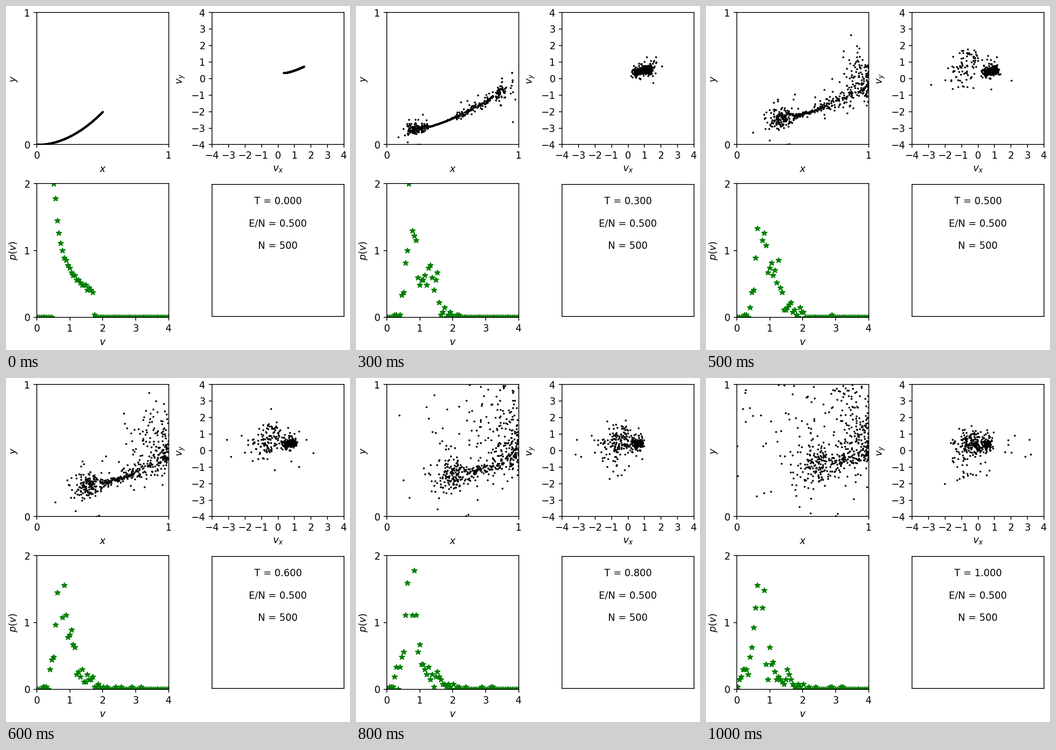
Recreate the animation shown at these times as a matplotlib script. Size 748x748 px, loop 1.05 s.

```python
import numpy as np
import matplotlib.pyplot as plt
from matplotlib.animation import FuncAnimation

SIZE, DPI = 748, 150
N, FRAMES, SUB = 500, 21, 10
DT = 0.05 / SUB


def simulate():
    """Stretched chain: both ends contract, the rest flies freely into the walls."""
    rng = np.random.default_rng(12)
    s = np.linspace(0, 1, N)
    pos = np.column_stack([s / 2, s**2 / 4])
    vel = np.exp(3 * pos)
    vel /= np.sqrt((vel**2).sum(1).mean())

    # Noise with a heavy tail
    noise = rng.normal(0, 0.08, (N, 2))
    noise *= np.where(rng.random(N) < 0.2, 3, 1)[:, None]

    rear, mid, front = s < 0.31, (s >= 0.31) & (s < 0.55), s > 0.85
    kick_time = rng.uniform(0.1, 0.3, N)
    kick_vel = vel + 1.3 * noise

    kick_time[rear] = 0.22 * (s[rear] / 0.31) ** 1.5
    clump = np.column_stack([0.56 - 0.28 * s, np.full(N, 0.385)])
    kick_vel[rear] = (clump + noise)[rear]

    kick_time[mid] = rng.uniform(0.25, 0.6, mid.sum())
    kick_vel[mid] = (0.96 * vel + 0.6 * noise)[mid]

    kick_time[front] = 1 - s[front]
    tip = np.column_stack([1.3 + 0.6 * (1 - s), 0.55 + 0.5 * (1 - s)])
    kick_vel[front] = (tip + 1.2 * noise)[front]

    def scatter(v, mean, spread, gain):
        n = len(v)
        angle = np.radians(rng.normal(mean, spread, n))
        speed = np.hypot(*v.T) * np.clip(rng.normal(gain, 0.3, n), 0.3, 1.6)
        return speed[:, None] * np.column_stack([np.cos(angle), np.sin(angle)])

    kicked = np.zeros(N, bool)
    bounced = np.zeros(N, bool)
    history = [(pos.copy(), vel.copy())]
    for step in range(1, (FRAMES - 1) * SUB + 1):
        now = ~kicked & ~bounced & (kick_time <= step * DT)
        vel[now] = kick_vel[now]
        kicked |= now
        pos += vel * DT

        hit = (pos[:, 0] > 1) & ~bounced
        vel[hit] = scatter(vel[hit], 112, 50, 0.93)
        bounced |= hit
        crowd = bounced & ~hit & (pos[:, 0] > 0.75) & (rng.random(N) < 5 * DT)
        vel[crowd] = scatter(vel[crowd], 98, 62, 0.9)

        high, low = pos > 1, pos < 0
        pos[high] = 2 - pos[high]
        pos[low] *= -1
        vel[high] = -np.abs(vel[high])
        vel[low] = np.abs(vel[low])
        if step % SUB == 0:
            history.append((pos.copy(), vel.copy()))
    return history


history = simulate()
edges = np.linspace(0, 4, 75)
centers = (edges[:-1] + edges[1:]) / 2

plt.rcParams.update({"font.family": "DejaVu Sans", "font.size": 10})
fig = plt.figure(figsize=((SIZE + 1e-6) / DPI,) * 2, dpi=DPI, facecolor="white")


def panel(left, top, right, bottom, xlim, ylim, xlabel="", ylabel="", ticks=True):
    ax = fig.add_axes([left / SIZE, 1 - bottom / SIZE,
                       (right - left) / SIZE, (bottom - top) / SIZE])
    ax.set(xlim=xlim, ylim=ylim)
    ax.set_xticks(range(xlim[0], xlim[1] + 1) if ticks else [])
    ax.set_yticks(range(ylim[0], ylim[1] + 1) if ticks else [])
    ax.set_xlabel(xlabel, labelpad=4.5)
    ax.set_ylabel(ylabel, labelpad=5.2)
    return ax


space = panel(67, 14.5, 353.7, 301.5, (0, 1), (0, 1), "$x$", "$y$")
phase = panel(448, 14.5, 735, 301.5, (-4, 4), (-4, 4), "$v_x$", "$v_y$")
hist = panel(67, 386.5, 353.7, 677, (0, 4), (0, 2), "$v$", "$p(v)$")
info = panel(448, 388.5, 735, 675.5, (0, 1), (0, 1), ticks=False)

dots, = space.plot([], [], "k.", ms=2)
speeds, = phase.plot([], [], "k.", ms=2)
stars, = hist.plot([], [], "g*")
clock = info.text(0.5, 0.853, "", ha="center")
info.text(0.5, 0.683, "E/N = 0.500", ha="center")
info.text(0.5, 0.513, f"N = {N}", ha="center")


def update(i):
    pos, vel = history[i]
    dots.set_data(*pos.T)
    speeds.set_data(*vel.T)
    density, _ = np.histogram(np.hypot(*vel.T), edges, density=True)
    stars.set_data(centers, density)
    clock.set_text(f"T = {i * SUB * DT:.3f}")
    return dots, speeds, stars, clock


anim = FuncAnimation(fig, update, frames=FRAMES, interval=50, repeat=True,
                     repeat_delay=0)
plt.show()
```
